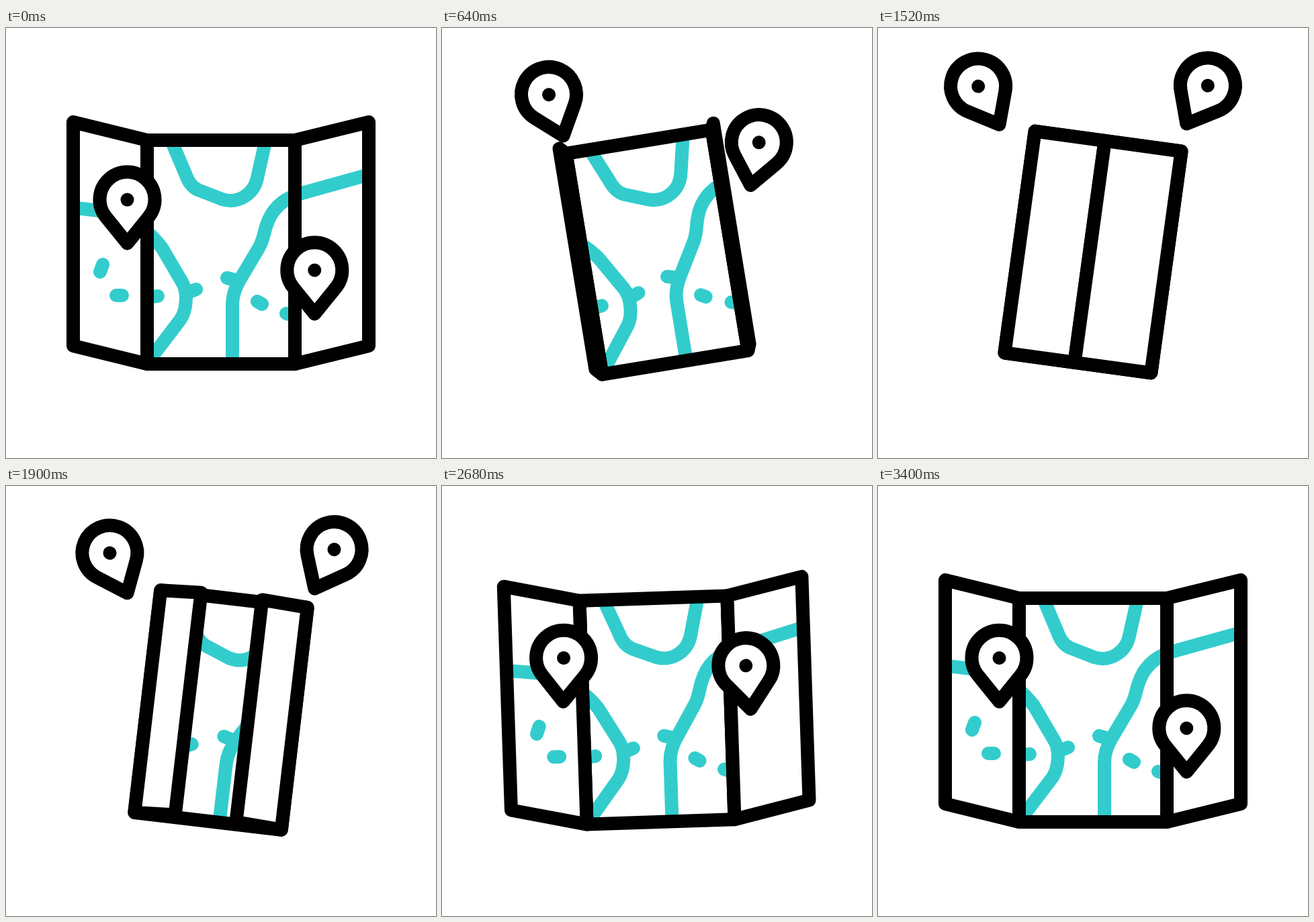
An HTML page with a canvas for the animation above (3600 ms loop, 640 by 640 pixels).

```html
<!DOCTYPE html>
<html>
<head>
<meta charset="utf-8">
<style>
html, body { margin: 0; height: 100%; overflow: hidden; background: #fff; }
canvas { display: block; }
</style>
</head>
<body>
<canvas id="stage" width="640" height="640"></canvas>
<script>
const ctx = document.getElementById('stage').getContext('2d');
const LOOP = 3600, FOLD_MIRROR = 2700, TEAL = '#33cccc';

const ROADS = new Path2D(`
  M245 165L267 217C271 229 277 237 286 241L322 255C345 262 369 248 374 223L387 165
  M70 264L148 273C178 277 212 300 232 327L262.5 379C271 394 269 420 259.5 434L213 495
  M337 505V412C337 397 342 385 348 375L377 326C384 313 384 303 388 293C396 269 414 253 440 246L580 207
  M144 352L140 363M164 398H173M217 400L226 399M273 393L283 389M329 372L340 375M374 407L381 411M417 425L424 427`);
const PIN = new Path2D('M0 0L-31.7 -39.2A41 41 0 1 1 31.7 -39.2Z');

const radians = degrees => degrees * Math.PI / 180;
const progress = (t, start, end) => Math.min(1, Math.max(0, (t - start) / (end - start)));
const easeInOut = u => u * u * (3 - 2 * u);
const easeOut = u => 1 - (1 - u) ** 3;

// Sum of eased moves, each [start, end, amount]
const moves = (t, ...list) =>
  list.reduce((sum, [start, end, amount]) => sum + amount * easeInOut(progress(t, start, end)), 0);

function panel(hinge, edge, rise, showRoads) {
  const shape = new Path2D();
  shape.moveTo(hinge, 167);
  shape.lineTo(edge, 167 - rise);
  shape.lineTo(edge, 500 - rise);
  shape.lineTo(hinge, 500);
  shape.closePath();
  ctx.fillStyle = '#fff';
  ctx.fill(shape);
  if (showRoads) {
    ctx.save();
    ctx.clip(shape);
    ctx.strokeStyle = TEAL;
    ctx.stroke(ROADS);
    ctx.restore();
  }
  ctx.strokeStyle = '#000';
  ctx.stroke(shape);
}

function drawMap(t) {
  const stretch = moves(t, [0, 440, 1], [2210, 2900, -1]);
  // The map unfolds as the mirror image of its folding
  const fold = easeOut(progress(Math.min(t, FOLD_MIRROR - t), 492, 1232));
  const tilt = moves(t, [0, 420, -9.3], [1060, 1460, 17.1], [1520, 1700, -1.1], [2150, 2330, -9.1], [2520, 3080, 2.4]);
  const width = 110 + 8 * stretch, rise = (27 - 9 * stretch) * (1 - fold);
  const left = 210 - width + 223 * fold, right = 430 + width - 233 * fold;
  ctx.save();
  ctx.translate(320, 333.5);
  ctx.rotate(radians(tilt));
  ctx.translate(-320, -333.5);
  panel(210, 430, 0, true);
  panel(210, left, rise, left < 210);
  panel(430, right, rise, right > 430);
  ctx.restore();
}

function drawPin(t, x, y, { rise, fall, swing, angle }) {
  const lift = easeOut(progress(t, rise, rise + 1200)) - progress(t, fall, fall + 1430) ** 3;
  const turn = moves(t - swing, [0, 1050, 1], [1450, 2100, -0.24], [2150, 2500, -0.98], [2500, 2860, 0.4], [2980, 3200, -0.18]);
  ctx.save();
  ctx.translate(x, y + (142.5 - y) * lift);
  ctx.rotate(radians(angle * turn));
  ctx.fillStyle = '#fff';
  ctx.fill(PIN);
  ctx.stroke(PIN);
  ctx.fillStyle = '#000';
  ctx.beginPath();
  ctx.arc(0, -65, 10, 0, 2 * Math.PI);
  ctx.fill();
  ctx.restore();
}

function draw() {
  const t = performance.now() % LOOP;
  ctx.fillStyle = '#fff';
  ctx.fillRect(0, 0, 640, 640);
  ctx.lineWidth = 20;
  ctx.lineCap = ctx.lineJoin = 'round';
  ctx.strokeStyle = '#000';
  drawMap(t);
  drawPin(t, 180.5, 321, { rise: 0, fall: 1250, swing: 0, angle: -29 });
  drawPin(t, 459.3, 425.5, { rise: 265, fall: 1430, swing: 200, angle: 29 });
  requestAnimationFrame(draw);
}
draw();
</script>
</body>
</html>
```
